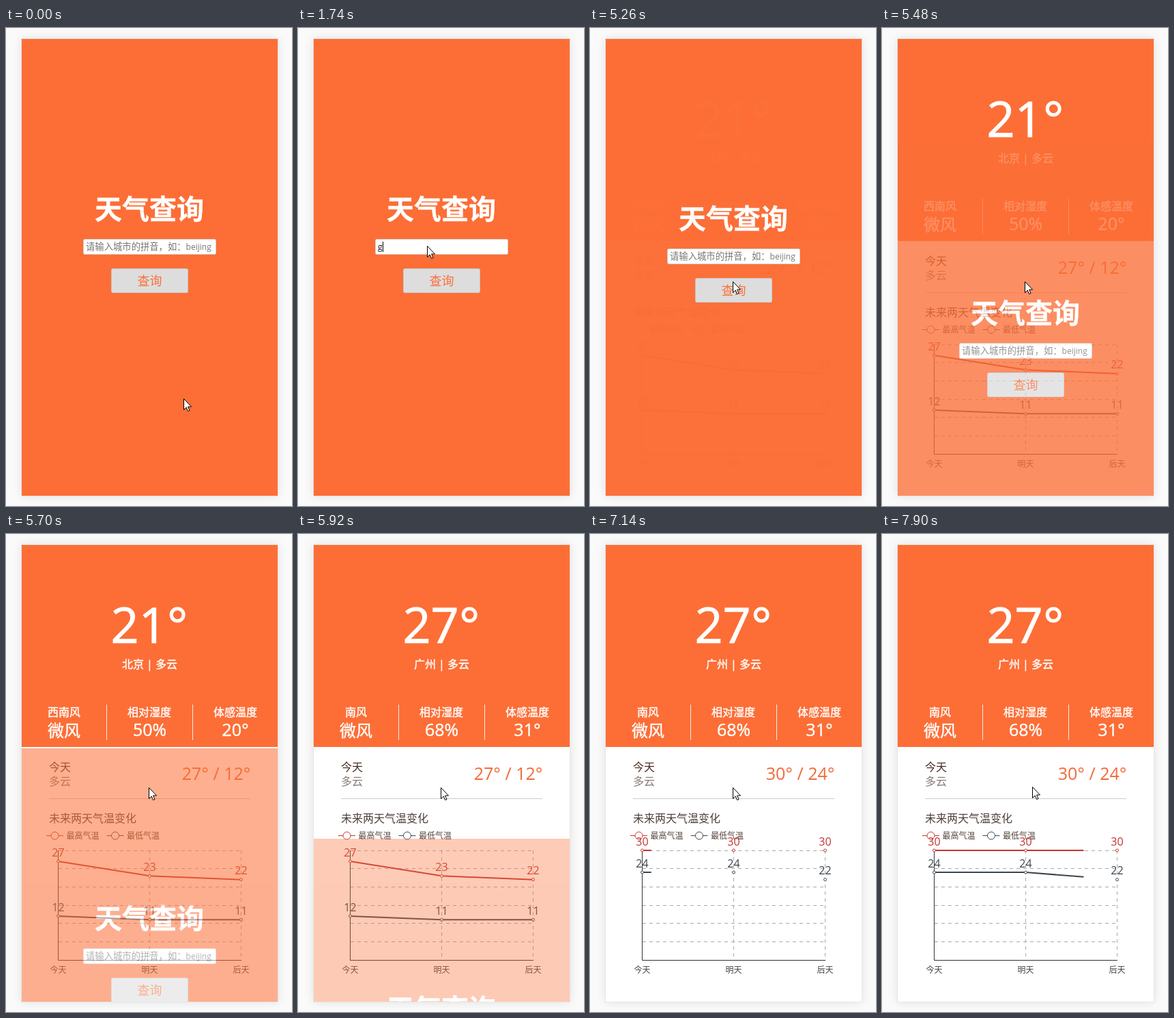
An HTML page for the animation above (8 s loop, 419 by 698 pixels).

```html
<!DOCTYPE html>
<html lang="zh-CN">
<head>
<meta charset="utf-8">
<title>天气查询</title>
<style>
  html, body { margin: 0; width: 100%; height: 100%; overflow: hidden; background: #fafafa; }
  svg { display: block; font: 16px 'Open Sans', 'Noto Sans CJK SC', 'Noto Sans CJK', sans-serif; }
  .mid { text-anchor: middle; }
  .big { font-size: 25px; }
  .wide { font-size: 24px; }
  .small { font-size: 12px; }
  .strong { fill: #fff; stroke: #fff; stroke-width: .4px; }
  .dash { stroke: #aaa; stroke-dasharray: 5 5; }
  .colon { font-family: 'Noto Sans CJK JP', sans-serif; }
  .panel { filter: drop-shadow(0 0 7px #0000001c); }
</style>
</head>
<body>
<svg width="419" height="698" viewBox="0 0 419 698">
  <defs>
    <clipPath id="phone"><rect x="23" y="16" width="375" height="667"/></clipPath>
    <clipPath id="reveal"><rect id="revealBox" x="70" y="440" height="200"/></clipPath>
  </defs>
  <rect class="panel" x="23" y="16" width="375" height="667" fill="#fff"/>
  <rect x="22.5" y="15.5" width="376" height="668" fill="none" stroke="#e8e6e5"/>
  <g clip-path="url(#phone)">
    <rect x="23" y="16" width="375" height="295" fill="#fc6e36"/>
    <g class="mid strong">
      <text id="temp" x="210" y="159" font-size="72" style="stroke-width: 1px"></text>
      <text id="place" x="210.5" y="196"></text>
      <text id="wind" x="85" y="266"></text>
      <text class="wide" x="85" y="295.5">微风</text>
      <text x="210" y="266">相对湿度</text>
      <text id="humid" class="big" x="210.5" y="295"></text>
      <text x="336" y="266">体感温度</text>
      <text id="feel" class="big" x="336" y="295"></text>
    </g>
    <path d="M147.5 249V301M273.5 249V301" stroke="#fff" stroke-opacity=".85"/>
    <text x="63" y="346" fill="#4a2a22">今天</text>
    <text x="63" y="367" fill="#8a7a74">多云</text>
    <text id="range" class="big" x="358.5" y="359" text-anchor="end" fill="#f2693a"></text>
    <path d="M63 386.5H358" stroke="#ccc"/>
    <text x="63" y="421" fill="#4d3c38">未来两天气温变化</text>
    <g id="legend" class="small" fill="#54403a"></g>
    <g id="grid" fill="none"></g>
    <g id="chart" class="mid"></g>
    <g id="days" class="mid small" fill="#444"></g>

    <g id="cover">
      <rect x="23" y="16" width="375" height="668" fill="#fc6e36"/>
      <text class="mid strong" x="210" y="279" font-size="40" font-weight="700">天气查询</text>
      <rect x="113.5" y="308.5" width="194" height="22" rx="2" fill="#fff" stroke="#d6c9c4"/>
      <text id="hint" x="117" y="324" font-size="13.333" fill="#757575">请输入城市的拼音，如<tspan class="colon">：</tspan><tspan class="small">beijing</tspan></text>
      <text id="typed" class="small" x="117" y="324" fill="#111"></text>
      <rect id="caret" y="312" width="1" height="15"/>
      <rect x="154.5" y="351.5" width="112" height="35" rx="2" fill="#ddd" stroke="#c9c4c4"/>
      <text class="mid" x="210.5" y="376" font-size="18" fill="#fc6e36">查询</text>
    </g>
  </g>
  <path id="mouse" d="M.5.5V16.5L4.2 13 6.6 18.5 9 17.5 6.6 12H11.5Z" fill="#fff" stroke="#000"/>
</svg>
<script>
const LOOP = 8000, TICK = 109.7;
const $ = id => document.getElementById(id);
const HIGH = '#c23531', LOW = '#3c4650';
const cols = [76.5, 210.5, 344.5];
const tempY = v => 622 - v * 160 / 30;

const weather = [
  { temp: '21°', place: '北京 | 多云', wind: '西南风', humid: '50%', feel: '20°' },
  { temp: '27°', place: '广州 | 多云', wind: '南风', humid: '68%', feel: '31°' }
];
const forecast = [
  { range: '27° / 12°', high: [27, 23, 22], low: [12, 11, 11] },
  { range: '30° / 24°', high: [30, 30, 30], low: [24, 24, 22] }
];

const word = 'guangzhou', keyTicks = [16, 17, 18, 20, 22, 32, 34, 35, 37];
const caretOn = [[8, 13], [16, 27], [31, 42]];
const SUBMIT = 48, NEW_WEATHER = 54, NEW_CHART = 65;
const slide = [[47.3, 0], [48, .0357], [50, .17], [52, .267], [57, .533], [65, 1]];
const mousePath = [[0, 260, 541], [1, 172, 284], [2, 172, 284], [3, 173, 280], [5, 180, 297], [8, 189, 318],
  [43, 189, 318], [47, 209, 370], [68, 209, 370], [72, 220, 369]];

function track(keys, k) {
  if (k <= keys[0][0]) return keys[0].slice(1);
  const i = keys.findIndex(key => key[0] >= k);
  if (i < 0) return keys.at(-1).slice(1);
  const [a, b] = [keys[i - 1], keys[i]], u = (k - a[0]) / (b[0] - a[0]);
  return a.slice(1).map((v, j) => v + (b[j + 1] - v) * u);
}

// CSS "ease": cubic-bezier(.25, .1, .25, 1)
function ease(x) {
  const bez = (s, p, q) => 3 * (1 - s) ** 2 * s * p + 3 * (1 - s) * s * s * q + s ** 3;
  let lo = 0, hi = 1;
  for (let i = 0; i < 24; i++) {
    const s = (lo + hi) / 2;
    if (bez(s, .25, .25) < x) lo = s; else hi = s;
  }
  return bez(lo, .1, 1);
}

function series(values, color) {
  const pts = values.map((v, i) => [cols[i], tempY(v)]);
  return `<polyline points="${pts.join(' ')}" fill="none" stroke="${color}" stroke-width="2" clip-path="url(#reveal)"/>` +
    pts.map(([x, y], i) => `<circle cx="${x}" cy="${y}" r="2" fill="#fff" stroke="${color}"/>
      <text x="${x}" y="${y - 7.5}" fill="${color}">${values[i]}</text>`).join('');
}

const legendItem = (x, label, color) =>
  `<path d="M${x} 440.5h25" stroke="${color}"/>
   <circle cx="${x + 12.5}" cy="440.5" r="5.5" fill="#fff" stroke="${color}"/>
   <text x="${x + 29.5}" y="445">${label}</text>`;

$('legend').innerHTML = legendItem(59, '最高气温', HIGH) + legendItem(147.5, '最低气温', LOW);
$('grid').innerHTML =
  [0, 1, 2, 3, 4, 5].map(i => `<path class="dash" d="M77 ${Math.floor(462 + i * 80 / 3) + .5}H345"/>`).join('') +
  cols.slice(1).map(x => `<path class="dash" d="M${x} 462V622"/>`).join('') +
  '<path d="M76.5 462V622.5H345" stroke="#333"/>';
$('days').innerHTML = ['今天', '明天', '后天'].map((d, i) => `<text x="${cols[i]}" y="641">${d}</text>`).join('');

let shown = -1;
function draw(k) {
  const now = weather[+(k >= NEW_WEATHER)];
  for (const id in now) $(id).textContent = now[id];

  const isNew = +(k >= NEW_CHART), data = forecast[isNew];
  if (shown !== isNew) {
    shown = isNew;
    $('range').textContent = data.range;
    $('chart').innerHTML = series(data.high, HIGH) + series(data.low, LOW);
  }
  const part = isNew ? Math.min(1, (k - 64.55) / 9.12) : 1;
  $('revealBox').setAttribute('width', 6.5 + 268 * part);

  const text = k < SUBMIT ? word.slice(0, keyTicks.filter(t => t <= k).length) : '';
  $('typed').textContent = text;
  $('hint').style.display = text ? 'none' : '';
  $('caret').style.display = caretOn.some(([a, b]) => k >= a && k < b) ? '' : 'none';
  $('caret').setAttribute('x', text ? Math.round(117.5 + $('typed').getComputedTextLength()) : 117);

  const p = ease(track(slide, k)[0]);
  $('cover').setAttribute('transform', `translate(0 ${Math.round(667 * p)})`);
  $('cover').style.opacity = 1 - p;
  $('cover').style.display = isNew ? 'none' : '';
  $('mouse').setAttribute('transform', `translate(${track(mousePath, k).map(Math.round)})`);
}

const start = performance.now();
function frame() {
  const t = (performance.now() - start) % LOOP;
  draw(Math.floor((t + 30) / TICK));
  requestAnimationFrame(frame);
}
frame();
</script>
</body>
</html>
```
